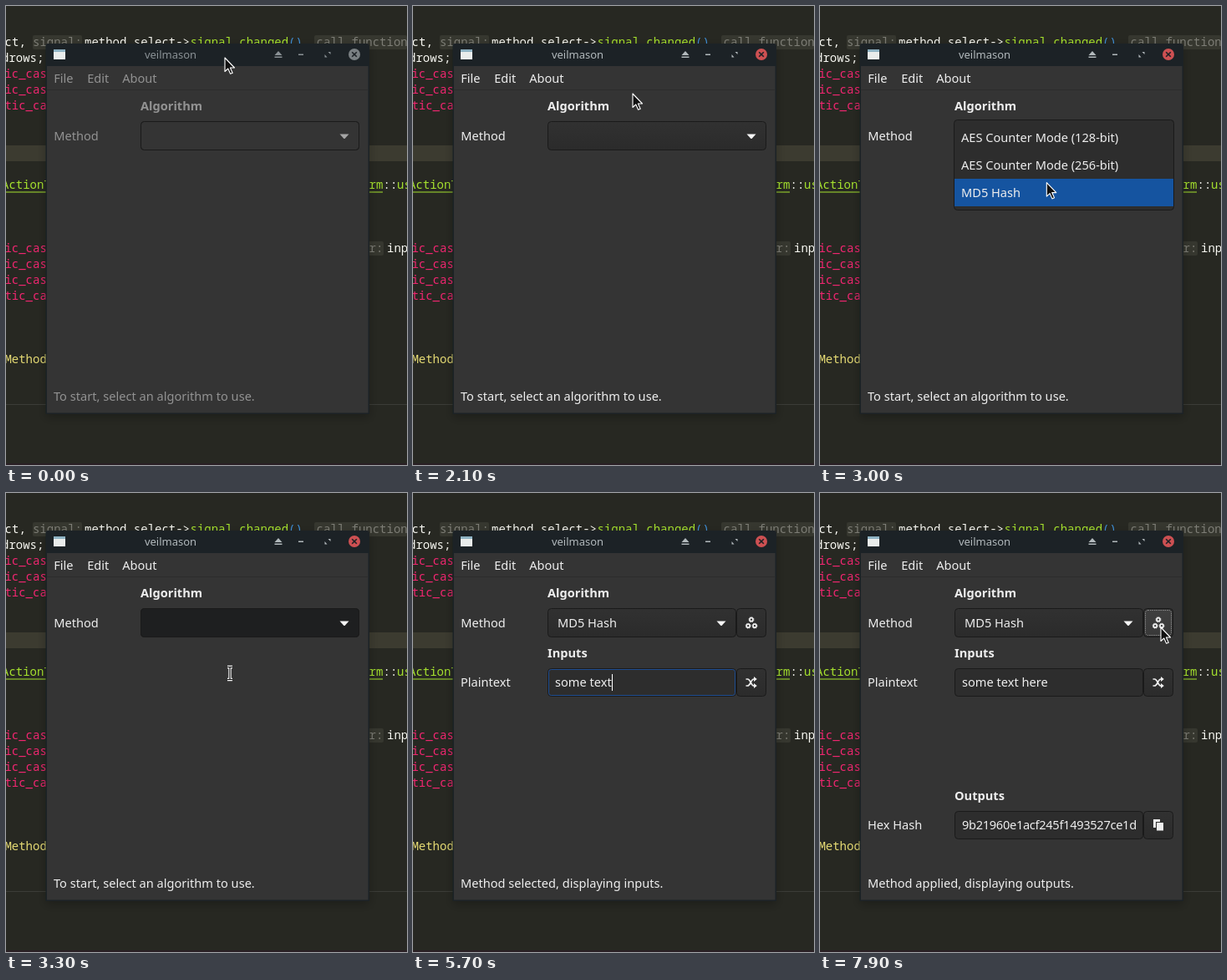
Animation of 480x550 px, one loop 8 s. Source, as an HTML page:

```html
<!DOCTYPE html>
<html lang="en">
<head>
<meta charset="utf-8">
<title>Hash tool demo</title>
<style>
  html, body { margin: 0; width: 100%; height: 100%; overflow: hidden; background: #272822; }
  svg { display: block; width: 480px; height: 550px; }
  text { white-space: pre; }
  .ui { font: 14.6px "Noto Sans", sans-serif; }
  .bold { font-weight: 700; }
  .title { font-size: 13px; }
  .tight { letter-spacing: -.3px; }
  .mono { font: 14px "Noto Sans Mono", monospace; }
</style>
</head>
<body>
<svg id="stage" viewBox="0 0 480 550" width="480" height="550">
  <defs>
    <linearGradient id="btn" x1="0" y1="0" x2="0" y2="1">
      <stop offset="0" stop-color="#313131"/><stop offset="1" stop-color="#2b2b2b"/>
    </linearGradient>
    <filter id="shadow" x="-10%" y="-10%" width="120%" height="120%">
      <feDropShadow dx="0" dy="4" stdDeviation="6" flood-color="#000" flood-opacity=".25"/>
    </filter>
    <clipPath id="field"><rect x="163" y="383" width="216" height="32"/></clipPath>
  </defs>
</svg>
<script>
const LOOP = 8000, STEP = 100;
const TYPED = 'some text here';
const KEYS = [4600, 4700, 4800, 4900, 5100, 5200, 5300, 5500, 5700, 5800, 5900, 6000, 6100, 6200];
// pointer stops: time, x, y
const PATH = [
  [0, 262, 62], [500, 262, 62], [900, 267, 84], [1300, 263, 105], [2100, 263, 105],
  [2400, 278, 157], [2700, 278, 161], [3100, 270, 221], [3300, 268, 216], [3400, 268, 216],
  [3800, 258, 229], [6800, 258, 229], [7400, 407, 163], [7600, 408, 161], [LOOP, 408, 161]
];
const stage = document.getElementById('stage');

function add(parent, tag, attrs, text) {
  const e = document.createElementNS('http://www.w3.org/2000/svg', tag);
  for (const k in attrs) e.setAttribute(k, attrs[k]);
  if (text !== undefined) e.textContent = text;
  parent.appendChild(e);
  return e;
}
const group = (parent, attrs) => add(parent, 'g', attrs || {});
const rect = (p, x, y, width, height, fill, more) =>
  add(p, 'rect', { x, y, width, height, fill, ...more });
const path = (p, d, attrs) => add(p, 'path', { d, ...attrs });
const label = (p, x, y, s, cls) => add(p, 'text', { x, y, class: 'ui ' + (cls || '') }, s);
const code = (x, y, s, fill) => add(stage, 'text', { x, y, fill, class: 'mono' }, s);
const box = (p, x, y, w, h, fill) =>
  rect(p, x + .5, y + .5, w - 1, h - 1, fill, { rx: 4, stroke: '#1a1a1a' });
const set = (e, k, v) => e.setAttribute(k, v);
const show = (e, on) => set(e, 'opacity', +on);
const ramp = (t, a, b) => Math.min(1, Math.max(0, (t - a) / (b - a)));
const mix = (a, b, p) => `rgb(${a.map((v, i) => Math.round(v + (b[i] - v) * p))})`;
const gray = (a, b, p) => mix([a, a, a], [b, b, b], p);

// editor behind the window
const PINK = '#f02670', GREEN = '#a6e22e', WHITE = '#f8f8f2', DIM = '#7d7d75', HINT = '#36372f';
rect(stage, 0, 0, 480, 550, '#272822');
rect(stage, 0, 167, 480, 19, '#3c3b30');
rect(stage, 0, 477, 480, 1, '#3b3c37');
rect(stage, 0, 548, 480, 2, '#2a2025');
rect(stage, 32, 35, 59, 17, HINT, { rx: 2 });
rect(stage, 369, 35, 111, 17, HINT, { rx: 2 });
rect(stage, 430, 282, 22, 17, HINT, { rx: 2 });
code(-1.4, 48, 'ct,', WHITE);
code(32, 48, 'signal:', DIM);
code(94, 48, 'method_select->', WHITE);
code(220.5, 48, 'signal_changed', GREEN);
code(338, 48, '()', '#3f8fd8');
code(355, 48, ',', WHITE);
code(371.5, 48, 'call_function', DIM);
code(-5, 67, 'drows;', WHITE);
for (const y of [86, 105, 295, 314, 333]) code(-1.6, y, 'ic_cast', PINK);
for (const y of [124, 352]) code(-1.6, y, 'tic_cast', PINK);
code(-5, 219, 'ActionT', GREEN);
rect(stage, 0, 222.5, 48, 1, GREEN);
code(434.5, 219, 'rm', GREEN);
rect(stage, 434, 222.5, 17, 1, GREEN);
code(451.5, 219, '::', WHITE);
code(468, 219, 'us', GREEN);
code(434.5, 295, 'r:', DIM);
code(456, 295, 'inp', WHITE);
code(-1.6, 428, 'Method', '#e6db74');

// window frame
const win = group(stage);
path(win, 'M47.5 489V48q0-3 3-3H432q3 0 3 3V489Z', { fill: '#1c2125', filter: 'url(#shadow)' });
rect(win, 49, 72, 384.5, 415.5, '#343434');
rect(win, 49, 100, 384.5, 1, '#2d2d2d');
rect(win, 57, 52, 14, 12, '#e9eceb');
rect(win, 57, 52, 14, 3, '#8fb3c4');
const bar = group(win);
add(bar, 'text', { x: 197, y: 63, class: 'ui title', 'text-anchor': 'middle' }, 'veilmason');
path(bar, 'M321.5 59L326 54L330.5 59ZM321.5 60.5H330.5V62H321.5Z');
rect(bar, 350, 57.5, 6, 1.5);
path(bar, 'M385.5 55H388.5V58ZM381.5 58V61.5H384.5Z');
const close = add(win, 'circle', { cx: 417, cy: 58, r: 7 });
path(win, 'M414.2 55.2L419.8 60.8M419.8 55.2L414.2 60.8', { stroke: '#1c2125', 'stroke-width': 1.6 });

// window contents
const body = group(win);
label(body, 57.2, 92, 'File');
label(body, 97.2, 92, 'Edit');
label(body, 139.2, 92, 'About');
label(body, 161, 125, 'Algorithm', 'bold');
label(body, 57.2, 161, 'Method');
const status = label(body, 57, 473, '');

const combo = box(win, 161, 138, 262, 35, 'url(#btn)');
const lit = box(win, 161, 138, 262, 35, '#1e1f20');
const flat = box(win, 161, 138, 262, 35, '#343434');
const arrow = path(win, 'M-5.5 -2.5H5.5L0.5 3H-0.5Z');

const inputs = group(win, { fill: '#eee' });
label(inputs, 173, 161, 'MD5 Hash');
label(inputs, 161, 197, 'Inputs', 'bold');
label(inputs, 57, 232, 'Plaintext');
const apply = box(inputs, 387, 138, 36, 35, 'url(#btn)');
const focusDash = rect(inputs, 389.5, 140.5, 31, 30, '#fff', {
  rx: 3, 'fill-opacity': .07, stroke: '#8c8c8c', 'stroke-dasharray': '1.5 1' });
for (const [cx, cy] of [[405, 151.7], [401.2, 159.2], [409, 159.2]]) {
  const ring = { cx, cy, fill: 'none', stroke: '#eee' };
  add(inputs, 'circle', { ...ring, r: 2, 'stroke-width': 1.7 });
  add(inputs, 'circle', { ...ring, r: 3, 'stroke-width': .9, 'stroke-dasharray': '1.18 1.18' });
}
box(inputs, 161, 210, 226, 34, '#2d2d2d');
const ring = rect(inputs, 162.5, 211.5, 223, 31, 'none', { rx: 3, stroke: '#1f4e92' });
box(inputs, 387, 210, 36, 34, 'url(#btn)');
path(inputs, 'M398.5 223H400.5C404 223 404.500 231 408 231H409M398.5 231H400.5C404 231 404.5 223 408 223H409',
  { fill: 'none', stroke: '#eee', 'stroke-width': 1.7 });
path(inputs, 'M408 220L411.8 223L408 226ZM408 228L411.8 231L408 234Z');
const typed = label(inputs, 170, 232, '');
const caret = rect(inputs, 170, 217, 1, 20, '#fff');

const outputs = group(win, { fill: '#eee' });
label(outputs, 161, 368, 'Outputs', 'bold');
label(outputs, 57, 403, 'Hex Hash');
box(outputs, 161, 381, 226, 34, '#2d2d2d');
box(outputs, 387, 381, 36, 34, 'url(#btn)');
rect(outputs, 399, 391, 8, 10, '#eee');
rect(outputs, 402.5, 394.5, 9, 10.5, '#eee', { stroke: '#2d2d2d' });
label(group(outputs, { 'clip-path': 'url(#field)' }), 170, 403, '9b21960e1acf245f1493527ce1d', 'tight');

// drop-down list
const popup = group(win, { fill: '#eee' });
box(popup, 160, 136, 264, 109, '#2d2d2d');
const hover = rect(popup, 161, 141, 262, 33, '#1554a0');
['AES Counter Mode (128-bit)', 'AES Counter Mode (256-bit)', 'MD5 Hash']
  .forEach((s, i) => label(popup, 169, 163 + 33 * i, s));

// pointers
const hand = path(stage, 'M0 0V16.5L3.8 13L6.6 19.3L9.2 18.2L6.4 12H11.5Z',
  { fill: '#111', stroke: '#fff', 'stroke-width': 1.1, 'stroke-linejoin': 'round' });
const beam = group(stage, { fill: 'none' });
for (const [stroke, w] of [['#fff', 3.4], ['#111', 1.2]])
  path(beam, 'M-3 -7.5H3M0 -7.5V7.5M-3 7.5H3', { stroke, 'stroke-width': w });

function pointer(t) {
  let i = 0;
  while (i < PATH.length - 2 && PATH[i + 1][0] <= t) i++;
  const [a, x, y] = PATH[i], [b, u, v] = PATH[i + 1];
  const p = ramp(t, a, b), e = p * p * (3 - 2 * p);
  return [x + (u - x) * e, y + (v - y) * e];
}

function draw(t) {
  const active = ramp(t, 0, 300), picked = t >= 3400, applied = t >= 7600;
  const [x, y] = pointer(t);

  set(bar, 'fill', mix([138, 145, 149], [178, 185, 188], active));
  set(close, 'fill', mix([122, 128, 131], [205, 80, 82], active));
  set(body, 'fill', gray(146, 238, active));
  set(arrow, 'fill', gray(165, 245, active));
  status.textContent = applied ? 'Method applied, displaying outputs.'
    : picked ? 'Method selected, displaying inputs.' : 'To start, select an algorithm to use.';

  for (const e of [combo, lit, flat]) set(e, 'width', picked ? 225 : 261);
  show(flat, 1 - active);
  show(lit, t < 2400 ? 0 : 1 - ramp(t, 3300, 3600));
  set(arrow, 'transform', `translate(${picked ? 369 : 405} 156)`);

  show(popup, t >= 2500 && t < 3200);
  set(hover, 'y', 141 + 33 * (y < 174 ? 0 : y < 207 ? 1 : 2));

  show(inputs, picked ? ramp(t, 3300, 3600) : 0);
  show(ring, ramp(t, 3800, 4100) - ramp(t, 7400, 7700));
  typed.textContent = TYPED.slice(0, KEYS.filter(k => k <= t).length);
  set(caret, 'x', Math.round(170 + typed.getComputedTextLength()));
  show(caret, t >= 3900 && t < 7500);
  set(apply, 'fill', t >= 7500 && t < 7600 ? '#1e1f20' : 'url(#btn)');
  show(focusDash, ramp(t, 7400, 7700));
  show(outputs, ramp(t, 7500, 7800));

  const overEntry = t >= 3200 && x > 161 && x < 387 && y > 210 && y < 244;
  const visible = t < 4600 || t >= 6800;
  const at = `translate(${x.toFixed(1)} ${y.toFixed(1)})`;
  set(hand, 'transform', at);
  set(beam, 'transform', at);
  show(hand, visible && !overEntry);
  show(beam, visible && overEntry);
}

const start = performance.now();
function tick() {
  const t = (performance.now() - start) % LOOP;
  draw(Math.floor(t / STEP) * STEP);
  requestAnimationFrame(tick);
}
tick();
</script>
</body>
</html>
```
